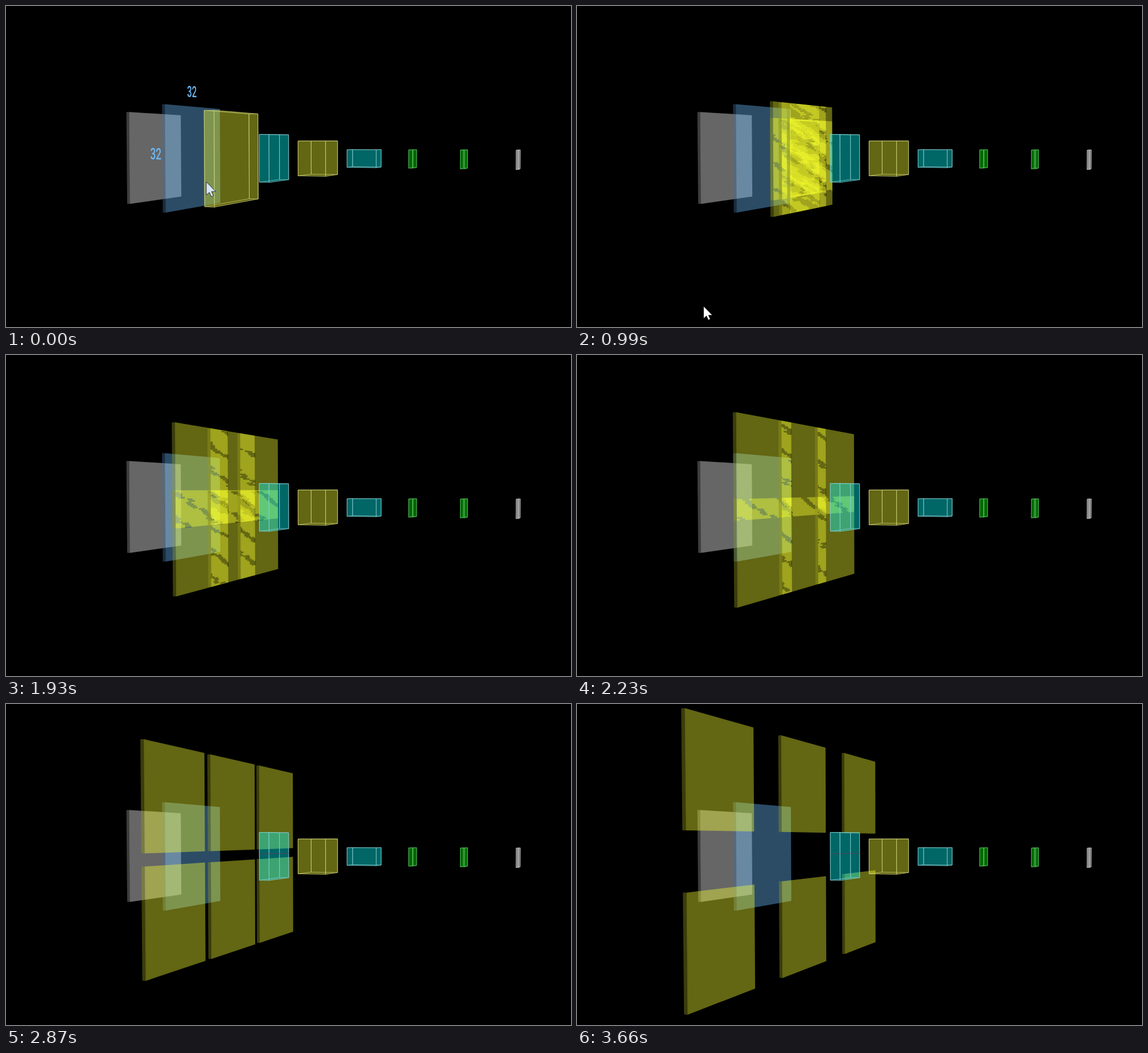
Recreate the animation shown at these times as an HTML page. Size 993 by 564 pixels, loop 4.16 s.

```html
<!DOCTYPE html>
<html lang="en">
<head>
<meta charset="utf-8">
<title>Layer unfolding</title>
<style>
  html, body { margin: 0; width: 100%; height: 100%; overflow: hidden; background: #000; }
  svg { display: block; width: 993px; height: 564px; }
  text { font: 500 27px Roboto, "Liberation Sans", sans-serif; fill: #6bb9f7; text-anchor: middle; }
</style>
</head>
<body>
<svg viewBox="0 0 993 564">
  <rect width="993" height="564" fill="#000"/>
  <g id="plates"></g>
  <g id="closed"></g>
  <g id="maps"></g>
  <g id="boxes"></g>
  <path id="seam" d="M446 263.5L497 262" stroke="#7a3358" stroke-opacity=".75" fill="none"/>
  <g id="labels">
    <text transform="matrix(.55 .03 0 1 326.8 160)">32</text>
    <text transform="matrix(.64 .01 0 1.03 263.2 269.5)">32</text>
  </g>
  <path id="cursor" d="M0 0V23L5.4 18.4L9 26L12.6 24.4L9.2 17H16.5Z" stroke="#111" stroke-width=".8"/>
</svg>
<script>
const LOOP = 4160, START = 500, STEP = 157.2, LAST = 21;
const THIN = .07;

const KINDS = {
  input:   { fill: '#ffffff', shade: '#9a9a9a' },
  padding: { fill: '#6fbdff', shade: '#456f98' },
  conv:    { fill: '#f7fe2e', shade: '#949a1c', line: '#cfd27a' },
  pooling: { fill: '#00ffff', line: '#84ced0' },
  dense:   { fill: '#00ff00', line: '#55b85c' },
  output:  { fill: '#ffffff', line: '#c2c2c2' }
};

// The row of layers, evenly spaced along one axis: kind, side length, depth
const LAYERS = [
  ['input', 1, THIN], ['padding', 1.14, THIN], ['conv', 1, .23], ['pooling', .5, .22],
  ['conv', .36, .6], ['pooling', .18, .61], ['dense', .18, .075], ['dense', .18, .08], ['output', .18, .045]
];

const $ = id => document.getElementById(id);

function add(parent, d, attrs) {
  const p = document.createElementNS('http://www.w3.org/2000/svg', 'path');
  p.setAttribute('d', d);
  for (const k in attrs) p.setAttribute(k, attrs[k]);
  return parent.appendChild(p);
}
const glass = color => ({ fill: color, 'fill-opacity': .4, 'fill-rule': 'evenodd' });

// Perspective: u runs across a layer, v down, w along the row; the maps lie at w = 0
function project(u, v, w = 0) {
  const z = 1 + .12892 * u - .0246 * w;
  const x = (401.23 + 128.92 * u + 61.5 * w) / z;
  const y = 236 + (30.1 + 159 * v - .2 * w) / z;
  return [x + (590 - x) * 2.3e-5 * (y - 270), y];
}
const poly = pts =>
  'M' + pts.map(p => project(...p).map(n => n.toFixed(1)).join(' ')).join('L') + 'Z';
const face = (u1, v1, u2, v2, w = 0) => poly([[u1, v1, w], [u2, v1, w], [u2, v2, w], [u1, v2, w]]);
const flank = (u, v1, v2, w1, w2) => poly([[u, v1, w1], [u, v1, w2], [u, v2, w2], [u, v2, w1]]);

function plate(kind, size, w) {
  const h = size / 2, g = $('plates');
  add(g, flank(-h, -h, h, w - THIN, w), glass(kind.shade));
  add(g, face(-h, -h, h, h, w), glass(kind.fill));
}

function box(parent, kind, size, back, front) {
  const h = size / 2;
  const near = face(-h, -h, h, h, front), left = flank(-h, -h, h, back, front);
  add(parent, left + near, glass(kind.fill));
  add(parent, left + near + face(-h, -h, h, h, back) + flank(h, -h, h, back, front),
    { fill: 'none', stroke: kind.line, 'stroke-opacity': .75, 'stroke-linejoin': 'round' });
}

LAYERS.forEach(([name, size, depth], i) => {
  const mid = i - 2 - THIN / 2, kind = KINDS[name];
  if (depth === THIN) plate(kind, size, mid + depth / 2);
  else box($(i === 2 ? 'closed' : 'boxes'), kind, size, mid - depth / 2, mid + depth / 2);
});

function noise(a, b) {
  const s = Math.sin(a * 127.1 + b * 311.7) * 43758.5453;
  return s - Math.floor(s);
}

// Coplanar panels fight for depth in jagged diagonal bands, more so where many overlap
function loses(u, v, row, layers, seed) {
  const [x, y] = project(u, v);
  const band = Math.sin(x * .1 - y * .14 + seed + 1.4 * noise(row >> 1, seed));
  return band > 1.2 - .35 * layers;
}

// Streaks of a panel that are hidden by the panels drawn before it
function holes(p, before, seed) {
  const H = 1 / 60, N = 44;
  let d = '';
  for (let r = Math.ceil(p.v / H); (r + 1) * H < p.v + 1; r++) {
    const v = (r + .5) * H;
    const level = before.filter(b => v > b.v && v < b.v + 1);
    let start = null;
    for (let c = 0; c <= N; c++) {
      const u = p.u + (c + .5) / N;
      const under = level.filter(b => u > b.u && u < b.u + 1).length;
      const lost = c < N && under > 0 && loses(u, v, r, under, seed);
      if (lost && start === null) start = p.u + c / N;
      if (!lost && start !== null) {
        d += face(start, r * H, p.u + c / N, (r + 1) * H);
        start = null;
      }
    }
  }
  return d;
}

// Six square panels, three by two, slide apart at constant speed
function drawMaps(step) {
  const g = $('maps'), gap = .079 * step - .149, done = [];
  g.textContent = '';
  if (step < 2) return;
  for (const col of [-1, 0, 1]) for (const half of [-.5, .5]) {
    const p = { u: col * gap - .5, v: half * gap - .5 };
    add(g, flank(p.u, p.v, p.v + 1, -THIN, 0), glass(KINDS.conv.shade));
    add(g, face(p.u, p.v, p.u + 1, p.v + 1) + holes(p, done, step + done.length), glass(KINDS.conv.fill));
    done.push(p);
  }
}

function drawCursor(step) {
  const [x, y] = step === 0 ? [352, 309] : step < 4 ? [382, 309] : [222.5, 527.5];
  const c = $('cursor');
  c.setAttribute('transform', `translate(${x} ${y}) scale(${step < 4 ? 1 : .93})`);
  c.setAttribute('fill', step === 0 ? '#d6e6fa' : '#fff');
  c.style.display = step < 5 ? '' : 'none';
}

let shown = -1;
function render(ms) {
  const t = ms % LOOP;
  const step = t < START ? 0 : Math.min(LAST, 1 + Math.floor((t - START) / STEP));
  if (step === shown) return;
  shown = step;
  $('labels').style.display = step ? 'none' : '';
  $('closed').style.display = step < 2 ? '' : 'none';
  $('seam').style.display = step > 15 ? '' : 'none';
  drawMaps(step);
  drawCursor(step);
}

const begin = performance.now();
function tick() {
  render(performance.now() - begin);
  requestAnimationFrame(tick);
}
tick();
</script>
</body>
</html>
```
